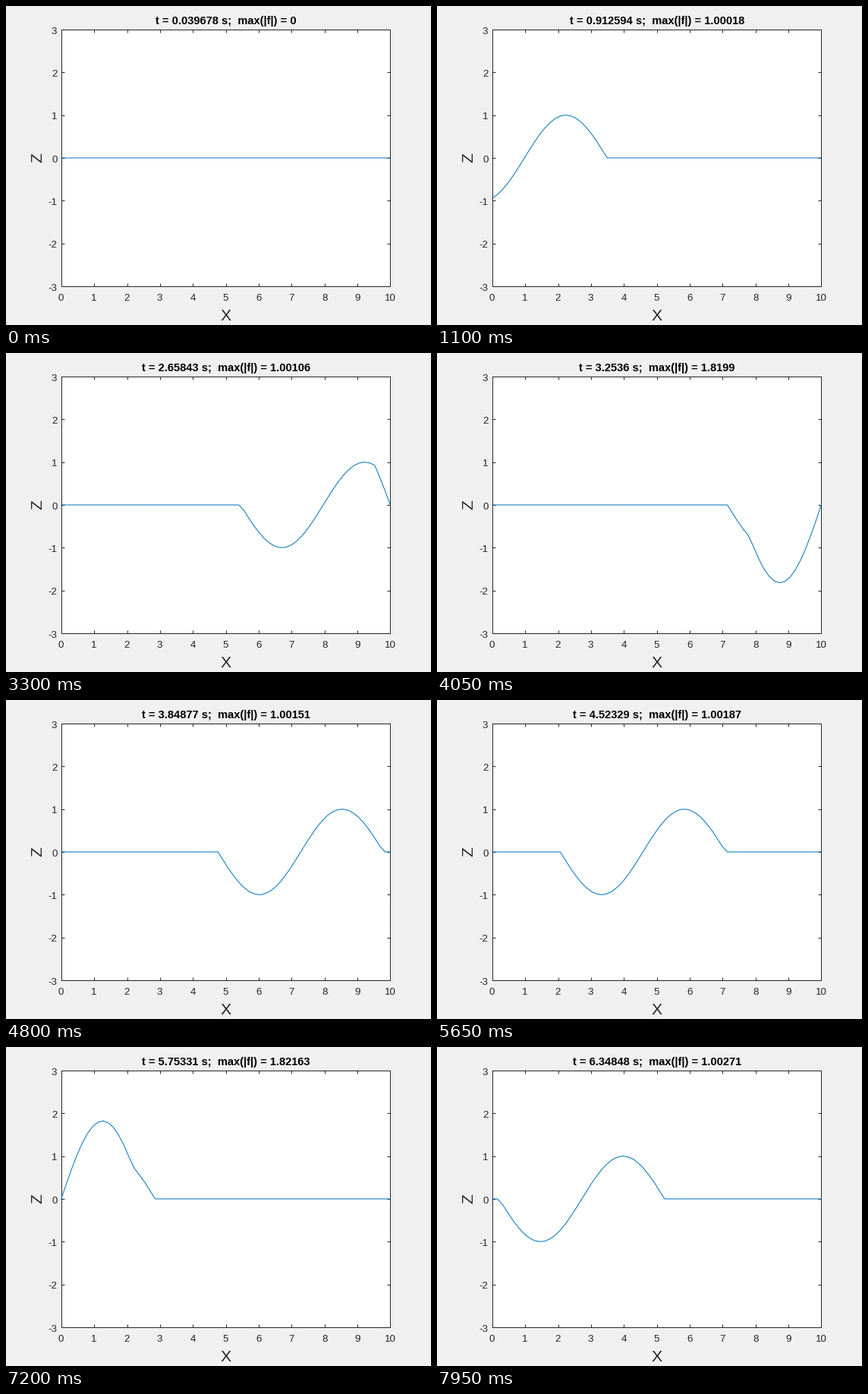
Write a matplotlib script that moves like this. It is 560x420 px and loops after 8 s.

```python
import numpy as np
import matplotlib.pyplot as plt
from matplotlib.animation import FuncAnimation

W, H, DPI = 560, 420, 100
FRAMES, INTERVAL = 160, 50
LEFT, RIGHT, TOP, BOTTOM = 72.8, 506.4, 31, 369
GREY = "#262626"

# Wave equation on a string: one sine period enters at the left, both ends fixed
LENGTH, NODES, SPEED, OMEGA, DT = 10, 64, 4, 5, 0.039678

plt.rcParams["font.family"] = "Liberation Sans"


def pt(px):
    return px * 72 / DPI


def solve():
    r2 = (SPEED * DT * (NODES - 1) / LENGTH) ** 2
    u = np.zeros((FRAMES, NODES))
    before = np.zeros(NODES)
    for n in range(1, FRAMES):
        now = u[n - 1]
        bend = now[2:] - 2 * now[1:-1] + now[:-2]
        u[n, 1:-1] = 2 * now[1:-1] - before[1:-1] + r2 * bend
        phase = OMEGA * n * DT
        u[n, 0] = np.sin(phase) if phase < 2 * np.pi else 0
        before = now
    return u


fig = plt.figure(figsize=(W / DPI, H / DPI), dpi=DPI, facecolor="#f0f0f0")
ax = fig.add_axes([LEFT / W, 1 - BOTTOM / H, (RIGHT - LEFT) / W, (BOTTOM - TOP) / H])
ax.set(xlim=(0, LENGTH), ylim=(-3, 3), xticks=range(11), yticks=range(-3, 4))
ax.tick_params(direction="in", top=True, right=True, length=pt(4.4), width=pt(1),
               color=GREY, labelbottom=False, labelleft=False)
for spine in ax.spines.values():
    spine.set(color=GREY, linewidth=pt(1))


def label(x, y, text, size, ha="center", color=GREY, **kw):
    """Text with its baseline at pixel (x, y), counted from the top left."""
    return fig.text(x / W, 1 - y / H, text, fontsize=pt(size), ha=ha,
                    va="baseline", color=color, **kw)


for k in range(11):
    label(72.1 + k * 43.45, 388, str(k), 13.33)
for k in range(-3, 4):
    label(67.5, 205.6 - k * (BOTTOM - TOP) / 6, str(k), 13.33, ha="right")
label(290, 414.4, "X", 21.33)
label(47, 200, "Z", 21.33, rotation=90, rotation_mode="anchor")
title = label(290, 24, "", 14.67, color="black", weight="bold")

x = np.linspace(0, LENGTH, NODES)
waves = solve()
curve, = ax.plot(x, waves[0], color="#0072BD", lw=pt(1), clip_on=False,
                 snap=False, zorder=5, solid_joinstyle="round")


def draw(n):
    curve.set_ydata(waves[n])
    peak = np.abs(waves[n]).max()
    title.set_text(f"t = {(n + 1) * DT:g} s;  max(|f|) = {peak:g}")
    return curve, title


anim = FuncAnimation(fig, draw, frames=FRAMES, interval=INTERVAL,
                     init_func=lambda: draw(0), repeat=True, repeat_delay=0)
plt.show()
```
